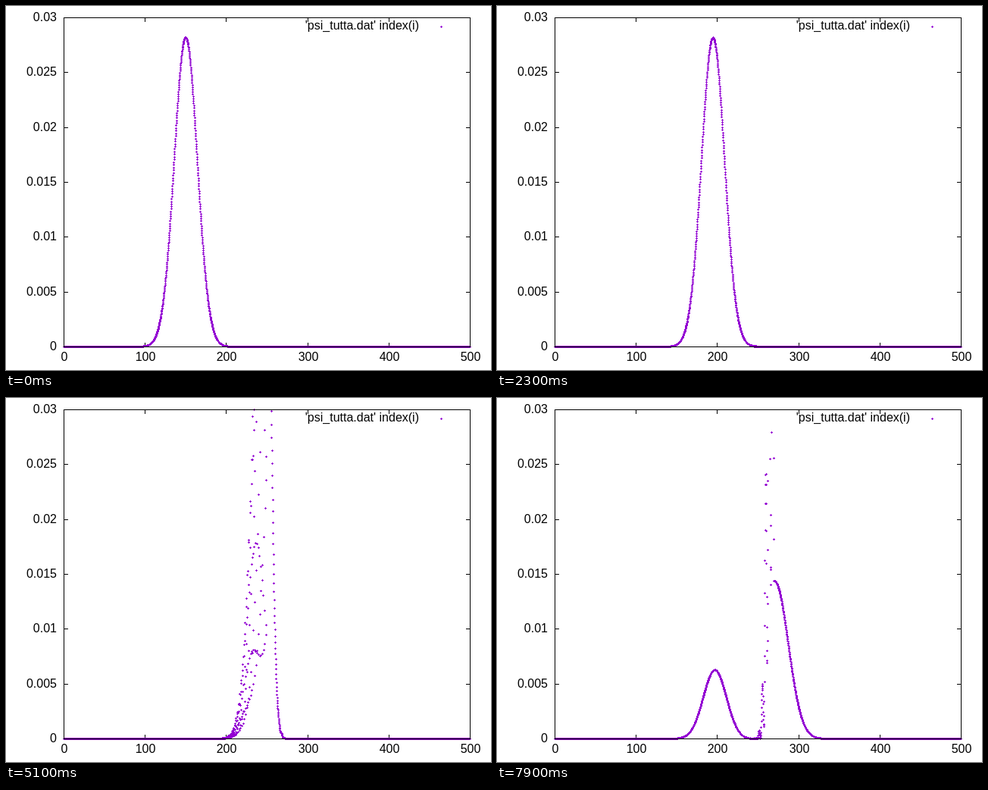
These frames come from a looping animation (640 by 480 pixels, 8 s). An HTML page with a canvas:

```html
<!DOCTYPE html>
<html lang="en">
<head>
<meta charset="utf-8">
<title>Wave packet at a barrier</title>
<style>
  html, body { margin: 0; width: 100%; height: 100%; overflow: hidden; background: #fff; }
  svg, canvas { position: absolute; left: 0; top: 0; width: 640px; height: 480px; }
  text { font: 16px "Liberation Sans", Arial, sans-serif; fill: #000; }
  .end { text-anchor: end; }
  .mid { text-anchor: middle; }
</style>
</head>
<body>
<svg id="axes" viewBox="0 0 640 480">
  <text class="end" x="545" y="31">'psi_tutta.dat' index(i)</text>
</svg>
<canvas id="plot" width="640" height="480"></canvas>
<script>
const LEFT = 76, RIGHT = 612, TOP = 15, BOTTOM = 449;
const X_MAX = 500, Y_MAX = 0.03;
const FRAMES = 80, FRAME_MS = 100;
const px = x => LEFT + Math.round(x / X_MAX * (RIGHT - LEFT));
const py = y => BOTTOM - Math.round(y / Y_MAX * (BOTTOM - TOP));

// Axis labels and ticks
const axes = document.getElementById('axes');
function add(name, attrs, text = '') {
  const el = document.createElementNS('http://www.w3.org/2000/svg', name);
  for (const key in attrs) el.setAttribute(key, attrs[key]);
  el.textContent = text;
  axes.append(el);
}
const bar = (x, y, width, height) => add('rect', { x, y, width, height });

for (let x = 0; x <= X_MAX; x += 100) {
  add('text', { class: 'mid', x: px(x) + 1, y: 468 }, x);
  bar(px(x), TOP, 1, 6);
  bar(px(x), BOTTOM - 5, 1, 6);
}
for (let i = 0; i <= 6; i++) {
  const y = i * 0.005;
  add('text', { class: 'end', x: 67, y: py(y) + 5 }, +y.toFixed(3));
  bar(LEFT, py(y), 6, 1);
  bar(RIGHT - 5, py(y), 6, 1);
}

// Crank-Nicolson solution of i psi' = -psi''/2 + V psi
function simulate() {
  const dx = 0.2, dt = 0.05, steps = 20, n = X_MAX / dx + 1;
  const k = 2, x0 = 150, sigma = 20;
  const V = x => x > 249.99 && x < 270.01 ? 1.7 : 0;
  const c = dt / (4 * dx * dx);
  const array = () => new Float64Array(n);
  const re = array(), im = array(), gr = array(), gi = array(), yr = array(), yi = array();
  const norm = 1 / Math.sqrt(sigma * Math.sqrt(Math.PI));

  for (let j = 0; j < n; j++) {
    const x = j * dx;
    const amp = norm * Math.exp(-((x - x0) ** 2) / (2 * sigma * sigma));
    re[j] = amp * Math.cos(k * x);
    im[j] = amp * Math.sin(k * x);
    const a = 1 + (j ? c * c * gr[j - 1] : 0);
    const b = 2 * c + dt / 2 * V(x) + (j ? c * c * gi[j - 1] : 0);
    const m = a * a + b * b;
    gr[j] = a / m;
    gi[j] = -b / m;
  }

  function step() {
    let ur = 0, ui = 0;
    for (let j = 0; j < n; j++) {
      const a = 2 * re[j] - c * ui, b = 2 * im[j] + c * ur;
      yr[j] = ur = a * gr[j] - b * gi[j];
      yi[j] = ui = a * gi[j] + b * gr[j];
    }
    ur = ui = 0;
    for (let j = n - 1; j >= 0; j--) {
      const a = -c * ui, b = c * ur;
      ur = yr[j] + a * gr[j] - b * gi[j];
      ui = yi[j] + a * gi[j] + b * gr[j];
      re[j] = ur - re[j];
      im[j] = ui - im[j];
    }
  }

  const frames = [];
  for (let f = 0; f < FRAMES; f++) {
    if (f) for (let s = 0; s < steps; s++) step();
    const points = [];
    for (let j = 0; j < n; j++) {
      const density = re[j] * re[j] + im[j] * im[j];
      if (density <= Y_MAX) points.push([px(j * dx), py(density)]);
    }
    frames.push(points);
  }
  return frames;
}

const ctx = document.getElementById('plot').getContext('2d');
function dot(x, y) {
  ctx.fillRect(x - 1, y, 3, 1);
  ctx.fillRect(x, y - 1, 1, 3);
}

function draw(points) {
  ctx.clearRect(0, 0, 640, 480);
  ctx.fillStyle = '#9400d3';
  dot(574, 27);
  for (const [x, y] of points) dot(x, y);
  ctx.strokeStyle = '#000';
  ctx.strokeRect(LEFT + 0.5, TOP + 0.5, RIGHT - LEFT, BOTTOM - TOP);
}

const frames = simulate();
const start = performance.now();
let shown = -1;
function tick() {
  const f = Math.floor((performance.now() - start) / FRAME_MS) % FRAMES;
  if (f !== shown) draw(frames[shown = f]);
  requestAnimationFrame(tick);
}
tick();
</script>
</body>
</html>
```
